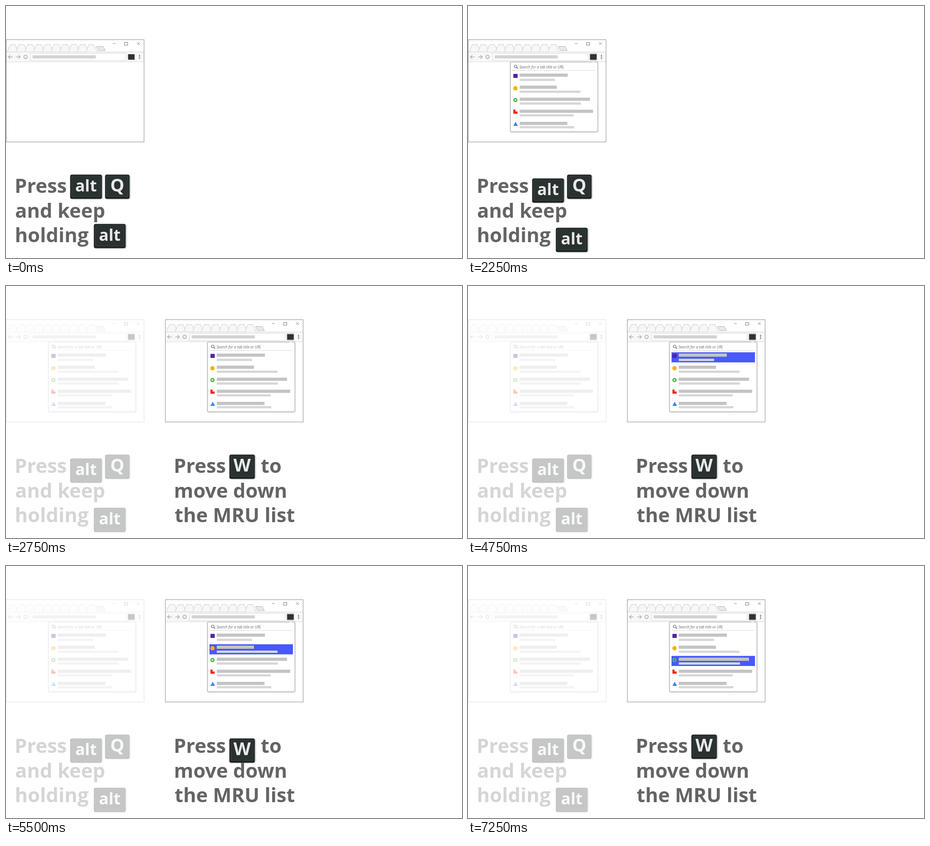
These frames come from a looping animation (1006 by 557 pixels, 8000 ms). An HTML page with a canvas:

```html
<!DOCTYPE html>
<html lang="en">
<head>
<meta charset="utf-8">
<title>Tab switching shortcuts</title>
<style>
  html, body { margin: 0; width: 100%; height: 100%; overflow: hidden; background: #fff; }
  canvas { display: block; }
</style>
</head>
<body>
<canvas id="stage" width="1006" height="557"></canvas>
<script>
const ctx = document.getElementById('stage').getContext('2d');
const LOOP = 8000;
const STEP = 351;
const FONT = '"Open Sans", "Noto Sans", sans-serif';

// Title bar and subtitle bar of each list entry: top, right end, top, right end.
const ROWS = [
  [149.3, 220, 160.8, 192],
  [176, 196, 187, 248],
  [202.6, 269, 213, 249],
  [229.2, 276, 239.2, 233],
  [256, 219.3, 265.4, 234.3]
];
const HIGHLIGHT_TOPS = [146.5, 173, 198.7];

function fillRect(x, y, right, bottom, color) {
  ctx.fillStyle = color;
  ctx.fillRect(x, y, right - x, bottom - y);
}

function path(points, { fill, stroke, close = true, width = 1 }) {
  ctx.beginPath();
  points.forEach(([x, y]) => ctx.lineTo(x, y));
  if (close) ctx.closePath();
  paint(fill, stroke, width);
}

function line(points, stroke, width = 1) {
  path(points, { stroke, width, close: false });
}

function circle(x, y, r, { fill, stroke, width = 1 }) {
  ctx.beginPath();
  ctx.arc(x, y, r, 0, Math.PI * 2);
  paint(fill, stroke, width);
}

function roundBox(x, y, w, h, r, { fill, stroke, width = 1 }) {
  ctx.beginPath();
  ctx.roundRect(x, y, w, h, r);
  paint(fill, stroke, width);
}

function paint(fill, stroke, width) {
  if (fill) { ctx.fillStyle = fill; ctx.fill(); }
  if (stroke) { ctx.strokeStyle = stroke; ctx.lineWidth = width; ctx.stroke(); }
}

function text(str, x, y, font, color, align = 'left') {
  ctx.font = `${font} ${FONT}`;
  ctx.textAlign = align;
  ctx.fillStyle = color;
  ctx.fillText(str, x, y);
}

function withShadow(color, blur, dx, dy, draw) {
  ctx.save();
  Object.assign(ctx, { shadowColor: color, shadowBlur: blur, shadowOffsetX: dx, shadowOffsetY: dy });
  draw();
  ctx.restore();
}

function drawTabs() {
  for (let i = 0; i < 10; i++) {
    const x = 2.5 + i * 19.3;
    if (i === 9) line([[1, 101.5], [304, 101.5]], '#d6d6d6');
    path([[x, 101.5], [x + 6.5, 85.5], [x + 18, 85.5], [x + 25, 101.5]],
      { fill: '#f7f7f7', stroke: '#c8c8c8', close: false });
  }
  path([[199.5, 89.5], [214.5, 89.5], [219, 98.5], [204, 98.5]], { fill: '#e9e9e9', stroke: '#b5b5b5' });
}

function drawBrowser(popup) {
  fillRect(0, 74, 305, 301, '#fff');
  fillRect(1, 102, 304, 123, '#f7f7f7');
  drawTabs();
  line([[1, 123.5], [304, 123.5]], '#dcdcdc');

  const gray = '#888';
  line([[235.5, 83], [242, 83]], gray);
  ctx.strokeStyle = '#777';
  ctx.strokeRect(261.5, 80.5, 7, 6);
  line([[288.8, 79.8], [295, 86]], gray);
  line([[295, 79.8], [288.8, 86]], gray);

  const nav = '#a0a0a0';
  for (const [tip, tail] of [[5.5, 14.5], [31.5, 22.5]]) {
    const barb = tip + Math.sign(tail - tip) * 4;
    line([[tip, 112.5], [tail, 112.5]], nav, 1.2);
    line([[barb, 108.3], [tip, 112.5], [barb, 116.7]], nav, 1.2);
  }
  circle(43, 112.3, 3.7, { stroke: nav, width: 1.4 });

  fillRect(54, 104, 265, 121, '#fff');
  ctx.strokeStyle = '#d9d9d9';
  ctx.lineWidth = 1;
  ctx.strokeRect(54.5, 104.5, 210, 16);
  fillRect(58.5, 109, 198, 116, '#d3d3d3');

  if (popup) roundBox(268, 104, 17, 17, 1.5, { fill: '#d2d2d2' });
  fillRect(269.3, 106.5, 283.7, 118.7, '#2c3132');
  for (const y of [109.3, 112.6, 115.9]) circle(294.4, y, 1.2, { fill: '#666' });

  ctx.strokeStyle = '#8c8c8c';
  ctx.lineWidth = 1;
  ctx.strokeRect(0.5, 74.5, 304, 226);
}

function drawIcons() {
  roundBox(100, 150, 9.5, 9, 1, { fill: '#5326a0' });
  circle(104.5, 181.8, 4.8, { fill: '#f7b100' });
  circle(104.5, 208, 3.3, { stroke: '#55b748', width: 2.9 });
  path([[100, 229], [104.8, 229], [104.8, 233.3], [109.3, 233.3], [109.3, 238], [100, 238]], { fill: '#f8250b' });
  path([[105, 255.8], [110.2, 265], [99.8, 265]], { fill: '#3f82f7' });
}

function drawPopup(selected) {
  withShadow('rgba(0,0,0,.25)', 2, 0, 0.5, () =>
    roundBox(93.5, 123.5, 193, 154.5, 2, { fill: '#fff', stroke: '#aaa' }));
  path([[273.5, 124.2], [277, 120.5], [280.5, 124.2]], { fill: '#fff', stroke: '#bbb', close: false });

  circle(105, 133.5, 3, { stroke: '#666', width: 1.1 });
  line([[107.2, 135.7], [110, 138.5]], '#666', 1.4);
  text('Search for a tab title or URL', 113.5, 137.5, 'italic 8.1px', '#686868');
  line([[98, 142.5], [281, 142.5]], '#dcdcdc');

  if (selected >= 0) {
    const top = HIGHLIGHT_TOPS[selected];
    fillRect(98, top, 282, top + 22.3, '#4958ff');
  }
  for (const [titleY, titleEnd, subY, subEnd] of ROWS) {
    fillRect(114, titleY, titleEnd, titleY + 7, '#c4c4c4');
    fillRect(114, subY, subEnd, subY + 5, '#d7d7d7');
  }
  drawIcons();
}

function drawKey(label, x, y, w, size, pressed) {
  const top = y + (pressed ? 8.5 : 0);
  withShadow('rgba(0,0,0,.35)', 3, 1.5, 0.5, () =>
    roundBox(x, top, w, 53.5, 4, { fill: '#1b2021' }));
  roundBox(x + 2, top + 2, w - 4, 48, 3, { fill: '#303737' });
  roundBox(x + 5, top + 4, w - 10, 43, 2, { fill: '#2a3131' });
  text(label, x + w / 2, top + 36.8, `bold ${size}px`, '#e9e9e9', 'center');
}

function drawCaption(lines) {
  for (const [str, x, y] of lines) text(str, x, y, 'bold 43.5px', '#646464');
}

function drawFirstPanel(t) {
  const open = t >= 1500;
  drawBrowser(open);
  if (open) drawPopup(-1);
  drawKey('alt', 141.5, 372.8, 70, 35.5, open);
  drawKey('Q', 218.5, 372.8, 54, 39, open && t < 2250);
  drawKey('alt', 193.8, 481.8, 70, 35.5, open);
  drawCaption([['Press', 19, 412.8], ['and keep', 20, 467.5], ['holding', 19.5, 521.5]]);
}

function drawSecondPanel(t) {
  const sinceFirstPress = t - 4250;
  const selected = Math.floor(sinceFirstPress / 1250);
  const pressed = sinceFirstPress >= 0 && sinceFirstPress % 1250 < 500;
  ctx.save();
  ctx.translate(STEP, 0);
  drawBrowser(true);
  drawPopup(selected);
  drawKey('W', 141.8, 372.8, 56, 39.5, pressed);
  drawCaption([['Press', 19, 412.8], ['to', 211, 412.8], ['move down', 19.5, 467.5], ['the MRU list', 21, 521.5]]);
  ctx.restore();
}

function draw(t) {
  fillRect(0, 0, 1006, 557, '#fff');
  drawFirstPanel(t);
  if (t >= 2750) {
    fillRect(0, 70, 340, 557, 'rgba(255,255,255,.73)');
    drawSecondPanel(t);
  }
}

const start = performance.now();
function tick() {
  draw((performance.now() - start) % LOOP);
  requestAnimationFrame(tick);
}
tick();
</script>
</body>
</html>
```
